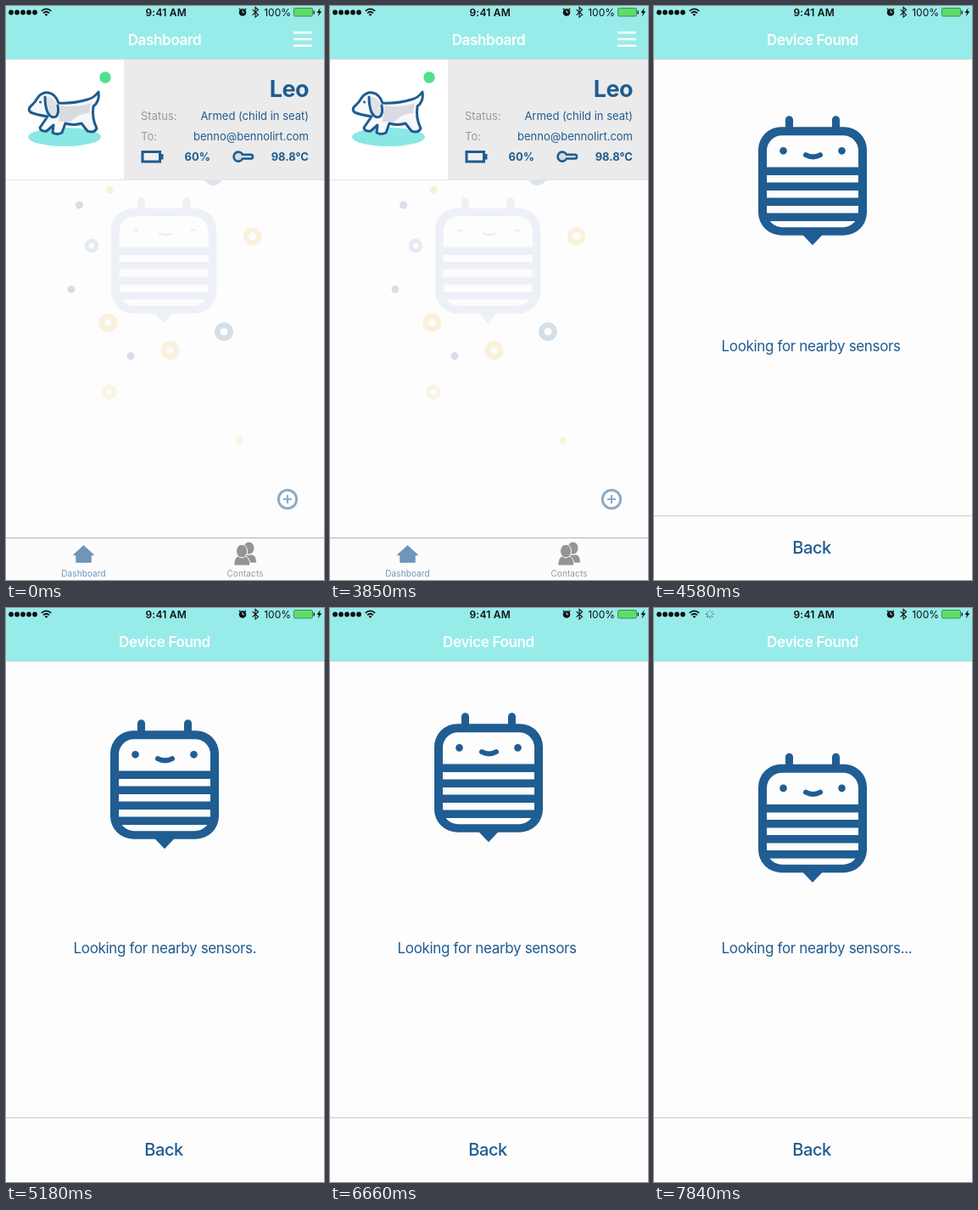
Write an HTML page that moves like this. It is 375 px wide and 675 px high and loops after 7990 ms.

```html
<!DOCTYPE html>
<html lang="en">
<head>
<meta charset="utf-8">
<title>Sensor app</title>
<style>
  html, body { margin: 0; width: 100%; height: 100%; overflow: hidden; background: #fdfdfd; }
  svg { display: block; width: 375px; height: 675px; font-family: Inter, Roboto, sans-serif; }
  .title { font-size: 17px; font-weight: 600; letter-spacing: -.02em; fill: #fff; text-anchor: middle; }
  .row { font-size: 13px; fill: #1f5c90; }
  .label { fill: #9a9a9a; }
  .end { text-anchor: end; }
  .bold { font-weight: 700; }
  .name { font-size: 27px; font-weight: 700; letter-spacing: -.02em; fill: #1f5c90; text-anchor: end; }
  .tab { font-size: 10px; letter-spacing: .01em; text-anchor: middle; }
  .search { font-size: 17px; letter-spacing: -.02em; fill: #1f5c90; }
  .back { font-size: 20px; font-weight: 500; letter-spacing: -.02em; fill: #1f5c90; text-anchor: middle; }
  .bar { font-size: 12px; fill: #111; }
  .line { fill: none; stroke: #1f5c90; stroke-width: 3; stroke-linecap: round; stroke-linejoin: round; }
</style>
</head>
<body>
<svg viewBox="0 0 375 675">
  <defs>
    <g id="shell">
      <path d="M159.500 18V4.500M214.500 18V4.500" stroke="currentColor" stroke-width="9" stroke-linecap="round"/>
      <path d="M175 139.500H199L187 152Z" fill="currentColor"/>
      <rect x="123" y="13" width="128" height="127.500" rx="27" fill="currentColor"/>
      <rect x="133" y="23" width="108" height="108" rx="18" fill="#fdfdfd"/>
      <path d="M132 65H242M132 83H242M132 101H242M132 119H242" stroke="currentColor" stroke-width="9.500"/>
    </g>
  </defs>

  <g id="dashboard">
    <rect width="375" height="675" fill="#fdfdfd"/>
    <g id="bubbles"></g>
    <g color="#edf1f7">
      <use href="#shell" transform="translate(4.400 225) scale(.972)"/>
      <path d="M150 265l3-2 3 2M218 265l3-2 3 2M180 267q8 5 15 0" fill="none" stroke="#e6ecf3" stroke-width="2"/>
    </g>

    <rect y="63" width="139" height="141" fill="#fff"/>
    <rect x="139" y="63" width="236" height="141" fill="#ebebeb"/>
    <path d="M0 204.500H375" stroke="#e3e3e3"/>
    <ellipse cx="69" cy="154" rx="43" ry="11" fill="#8ae8e4"/>
    <path id="dog" d="M28 119Q34 114 38 107Q43 101 50 102Q58 103 62 114Q80 115 96 110Q104 108 109 101Q111 112 103 118Q101 132 107 144Q104 150 96 147L89 138Q80 141 70 138L66 149Q60 152 55 149L56 140L48 147Q41 148 40 143L49 130Q36 128 29 125Q26 122 28 119Z" fill="#f7f8fa"/>
    <path d="M64 117Q84 120 100 114L98 126Q86 126 76 136L62 136Z" fill="#d9dbe1"/>
    <path d="M46 106Q46 118 49 125Q53 133 59 130Q63 126 60 117Q57 107 46 106Z" fill="#dfe2e8"/>
    <use href="#dog" class="line" style="fill-opacity:0"/>
    <path class="line" d="M46 107Q46 118 49 125Q53 133 59 130Q63 126 61 117"/>
    <circle cx="40.500" cy="113" r="1.500" fill="#1f5c90"/>
    <circle cx="117" cy="84" r="6.700" fill="#50e08f"/>

    <text class="name" x="357" y="107">Leo</text>
    <text class="row label" x="159" y="134">Status:</text>
    <text class="row end" x="357" y="134">Armed (child in seat)</text>
    <text class="row label" x="159" y="158">To:</text>
    <text class="row end" x="357" y="158">benno@bennolirt.com</text>
    <text class="row bold end" x="241" y="182">60%</text>
    <text class="row bold end" x="357" y="182">98.8°C</text>
    <rect x="161" y="171.500" width="20.500" height="11.500" fill="#f0f0f0" stroke="#1f5c90" stroke-width="3"/>
    <path d="M184 174V180.500" stroke="#1f5c90" stroke-width="3"/>
    <path d="M279 174.800H289Q291 174.800 291 177.200Q291 179.500 289 179.500H279A5.500 5.500 0 1 1 279 174.800Z" fill="#d3dae2" stroke="#1f5c90" stroke-width="2.600"/>

    <rect width="375" height="62.500" fill="#97ece9"/>
    <path d="M0 62.500H375" stroke="#c3dddc"/>
    <text class="title" x="187" y="46">Dashboard</text>
    <path d="M339 31.200H361M339 39H361M339 46.800H361" stroke="#fff" stroke-width="2.400"/>

    <g fill="none" stroke="#8eabc6" stroke-width="3">
      <circle cx="332" cy="580" r="10.700" fill="#fff"/>
      <path d="M327 580H337M332 575V585" stroke-width="2.200"/>
    </g>

    <rect y="626" width="375" height="49" fill="#fcfcfc"/>
    <path d="M0 625.500H375" stroke="#b2b2b2"/>
    <path d="M91.500 635L103 645.500H100V654H83V645.500H80Z" fill="#6f95ba" stroke="#6f95ba" stroke-width="1.500" stroke-linejoin="round"/>
    <g fill="#949494" stroke="#fcfcfc">
      <path d="M280 655V645H291Q295.500 647 295.500 655Z"/>
      <ellipse cx="286.500" cy="637.500" rx="6.500" ry="7.500"/>
      <path d="M268.800 658Q268.500 650 273 647H283Q288 650 287.700 658Z"/>
      <ellipse cx="278" cy="641" rx="6.500" ry="7.800"/>
    </g>
    <text class="tab" x="91.500" y="671" fill="#6b94b9">Dashboard</text>
    <text class="tab" x="282" y="671" fill="#989898">Contacts</text>
  </g>

  <g id="sheet">
    <rect width="375" height="675" fill="#fdfdfd"/>
    <rect width="375" height="62.500" fill="#97ece9"/>
    <path d="M0 62.500H375" stroke="#c0d5d4"/>
    <text class="title" x="187" y="46">Device Found</text>
    <g id="mascot" color="#205d92">
      <use href="#shell"/>
      <circle cx="152.500" cy="41.200" r="4.300" fill="currentColor"/>
      <circle cx="221.500" cy="41.200" r="4.300" fill="currentColor"/>
      <path d="M179 46Q187.500 50.500 196 46" fill="none" stroke="currentColor" stroke-width="6" stroke-linecap="round"/>
    </g>
    <text class="search" id="search" x="79.500" y="405.500"></text>
    <path d="M0 599.500H375" stroke="#c9c9c9"/>
    <text class="back" x="186" y="644">Back</text>
  </g>

  <g id="status" fill="#111">
    <path d="M6 7.500H34.200" stroke="#111" stroke-width="5.800" stroke-linecap="round" stroke-dasharray="0 7"/>
    <path d="M41.800 5.800Q47.500 .800 53.200 5.800M44 8.300Q47.500 5.200 51 8.300" fill="none" stroke="#111" stroke-width="1.700"/>
    <path d="M45.500 9.800Q47.500 8.200 49.500 9.800L47.500 12Z"/>
    <g id="spinner" stroke="#333" stroke-width="1"></g>
    <text class="bar" x="188.800" y="11.500" text-anchor="middle" font-weight="600" letter-spacing=".02em">9:41 AM</text>
    <circle cx="279" cy="7.500" r="4.300"/>
    <path d="M274.800 4.300L276.300 2.900M283.200 4.300L281.700 2.900" stroke="#111" stroke-width="1.200"/>
    <path d="M279 4.800V7.700H281.200" fill="none" stroke="#97ece9"/>
    <path d="M290.500 4.200L297.500 10.300L294 13.200V1.500L297.500 4.500L290.500 10.600" fill="none" stroke="#111" stroke-width="1.100"/>
    <text class="bar" x="336" y="11.500" text-anchor="end">100%</text>
    <rect x="339.500" y="2.500" width="22" height="9.500" rx="1.500" fill="#5fdc68" stroke="#3d8f55"/>
    <path d="M363.300 5.500V9.500" stroke="#222" stroke-width="1.500"/>
    <path d="M370.800 2L366.500 8H369L367.800 12.500L372.300 6.300H369.700Z"/>
  </g>
</svg>
<script>
const LOOP = 7990, OPEN = 3850, TICK = 147.86;
const $ = id => document.getElementById(id);

function add(parent, tag, attrs) {
  const el = document.createElementNS('http://www.w3.org/2000/svg', tag);
  for (const key in attrs) el.setAttribute(key, attrs[key]);
  parent.appendChild(el);
  return el;
}

// x, y, radius, ring width (0 = solid dot), colour
const cream = '#fbf0dc', blue = '#d5dfe9';
[
  [122, 216, 4.5, 0, cream], [86.5, 234, 4.5, 0, blue],
  [244.5, 200, 8, 6, '#dbe4ed'], [101, 282, 5.7, 5, '#e5eaf2'],
  [290.5, 271, 7.7, 6, cream], [77, 333, 4.5, 0, blue],
  [120.5, 372.5, 7.5, 7, cream], [257, 383, 7.7, 6.5, blue],
  [193.5, 405, 7.5, 7, cream], [147, 411.5, 4.5, 0, blue],
  [122, 454, 6, 5, '#faf4e2'], [275, 511, 4.5, 0, '#faf4de']
].forEach(([cx, cy, r, w, color]) => add($('bubbles'), 'circle', {
  cx, cy, r, fill: w ? 'none' : color, stroke: w ? color : 'none', 'stroke-width': w
}));

const spokes = Array.from({ length: 8 }, (_, i) => add($('spinner'), 'path', {
  d: 'M0 -2.5V-5', transform: `translate(65.8 7.2) rotate(${i * 45})`
}));

// Critically damped slide from the bottom edge
function slide(t) {
  const p = Math.max(0, t - 3870) / 1000 * 18.95;
  return 675 * (1 + p) * Math.exp(-p);
}

const bounce = t => 145.1 + 25.7 * Math.cos(2 * Math.PI * (t - 5850) / 1960);
const dotCount = t => t < 4260 ? 3 : Math.floor((t - 4260) / 500) % 4;

function draw(now) {
  const time = now % LOOP;
  const open = time >= OPEN;
  // The screen refreshes in steps
  const t = open ? OPEN + Math.floor((time - OPEN + 12) / TICK) * TICK : 0;

  $('sheet').style.display = open ? '' : 'none';
  $('sheet').setAttribute('transform', `translate(0 ${slide(t).toFixed(2)})`);
  $('mascot').setAttribute('transform', `translate(0 ${bounce(t).toFixed(2)})`);
  $('search').textContent = 'Looking for nearby sensors' + '.'.repeat(dotCount(t));

  $('spinner').style.display = t > 7380 ? '' : 'none';
  const lead = Math.floor(t / 125);
  spokes.forEach((s, i) => s.setAttribute('opacity', 1 - ((lead - i + 8) % 8) * .1));
}

const start = performance.now();
function loop() {
  draw(performance.now() - start);
  requestAnimationFrame(loop);
}
loop();
</script>
</body>
</html>
```
